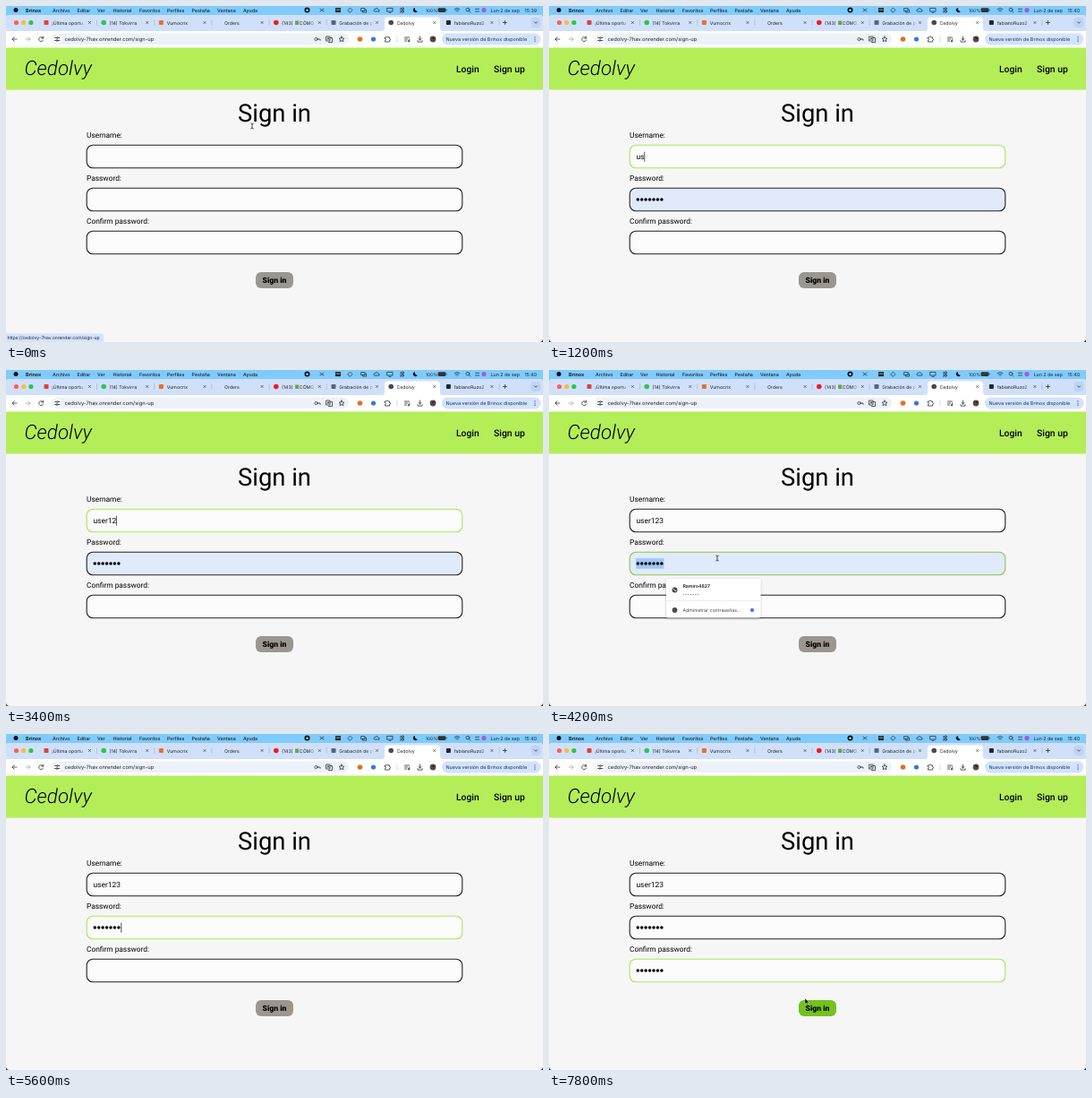
An HTML page for the animation above (8 s loop, 600 px wide and 375 px high).

```html
<!DOCTYPE html>
<html lang="es">
<head>
<meta charset="utf-8">
<title>Sign in</title>
<style>
  html, body { margin: 0; width: 100%; height: 100%; overflow: hidden; background: #222; }
  svg { display: block; }
  #stage { width: 100%; height: 100%; }
  text { font-family: Inter, sans-serif; fill: #1f1f1f; text-rendering: geometricPrecision; white-space: pre; }
  .page text { font-family: Roboto, sans-serif; fill: #000; }
  .line { fill: none; stroke: #333; stroke-width: .8; stroke-linecap: round; stroke-linejoin: round; }
  .box { stroke-width: 1.1; }
</style>
</head>
<body>
<svg id="stage" viewBox="0 0 600 375">
  <defs>
    <linearGradient id="fade"><stop offset="0" stop-color="#d1e0fa" stop-opacity="0"/><stop offset="1" stop-color="#d1e0fa"/></linearGradient>
    <filter id="shadow" x="-10%" y="-10%" width="120%" height="130%"><feDropShadow dx="0" dy=".8" stdDeviation="1" flood-opacity=".3"/></filter>
  </defs>

  <rect width="600" height="60" fill="#80cbfd"/>
  <g id="menu" transform="translate(0 -.4)"></g>

  <path d="M0 14q0-4 4-4h592q4 0 4 4v357q0 4-4 4h-592q-4 0-4-4z" fill="#f6f6f6"/>
  <path d="M0 28v-14q0-4 4-4h592q4 0 4 4v14z" fill="#d1e0fa"/>
  <path d="M420 28q3 0 3-3v-9q0-3.500 3.500-3.500h55q3.500 0 3.500 3.500v9q0 3 3 3z" fill="#fff"/>
  <rect x="586.500" y="13" width="11" height="11" rx="3" fill="#c0d3f6"/>
  <g id="tabs"></g>

  <rect y="28" width="600" height="19" fill="#fff"/>
  <rect x="51" y="30.500" width="332" height="12.500" rx="6.250" fill="#edf1fa"/>
  <circle cx="57.500" cy="37" r="4.800" fill="#fff"/>
  <g class="line">
    <path d="M12 37h-5m2.200-2.200l-2.200 2.200l2.200 2.200"/>
    <path d="M22 37h5m-2.200-2.200l2.200 2.200l-2.200 2.200" stroke="#aaa"/>
    <path d="M41.500 36a2.500 2.500 0 1 0 .1 2m0-4v2h-2"/>
    <path d="M54.500 35.500h2m2 0h1.500m-5.500 3h1.500m2 0h2"/><circle cx="57.500" cy="35.500" r=".9"/><circle cx="57" cy="38.500" r=".9"/>
    <circle cx="346.500" cy="37" r="1.600"/><path d="M348 37h3v1.300"/>
    <path d="M358 34h4v5h-4zm4 1.500h2.500v5h-4M359 37.500l1-2.200l1 2.200"/>
    <path d="M375 34l.9 2l2.100.2l-1.600 1.400l.5 2.100l-1.900-1.100l-1.900 1.100l.5-2.100l-1.600-1.400l2.100-.2z"/>
    <path d="M423.500 35h1.500a1 1 0 0 1 2 0h1.500v1.500a1 1 0 0 1 0 2v1.500h-5v-1.500a1 1 0 0 0 0-2z"/>
    <path d="M445.500 35h5m-5 2h3m-3 2h2m3-2v2.500"/><circle cx="449.700" cy="39.300" r=".6"/>
    <path d="M462.500 34v4m-1.800-1.700l1.800 1.700l1.800-1.700m-4.300 2.300v1.500h5v-1.500"/>
    <path d="M437 34v6" stroke="#c8d4ea"/>
  </g>
  <circle cx="395.500" cy="37" r="2.800" fill="#e2701e"/>
  <circle cx="410.500" cy="37" r="2.600" fill="#3478e0"/>
  <circle cx="477" cy="37" r="3.400" fill="#574943"/><circle cx="477.500" cy="36" r="1.100" fill="#211c1b"/>
  <text x="65.500" y="39" font-size="5.800">cedolvy-7hav.onrender.com/sign-up</text>
  <rect x="487" y="30.500" width="110.500" height="13" rx="6.500" fill="#d3e3fd"/>
  <text x="491.500" y="39" font-size="5.450" style="fill:#14315f">Nueva versión de Brinox disponible</text>
  <g fill="#14315f"><circle cx="591" cy="34.800" r=".6"/><circle cx="591" cy="37" r=".6"/><circle cx="591" cy="39.200" r=".6"/></g>

  <g class="page">
    <rect y="46.500" width="600" height="47" fill="#b3ee59"/>
    <text x="20.500" y="77" font-size="22.400" font-weight="300" font-style="italic">Cedolvy</text>
    <text x="503" y="74" font-size="10.300" font-weight="500">Login</text>
    <text x="545" y="74" font-size="10.400" font-weight="500">Sign up</text>
    <text x="300" y="128.800" font-size="27.400" text-anchor="middle">Sign in</text>
    <g id="fields"></g>
    <rect id="button" x="279" y="297" width="42" height="18" rx="6"/>
    <text x="300" y="308.800" font-size="8.600" font-weight="900" text-anchor="middle">Sign in</text>
  </g>

  <g id="popup">
    <rect width="105.500" height="43.500" rx="2" fill="#fff" filter="url(#shadow)"/>
    <path d="M0 24.500h105.500" stroke="#e2e2e2" stroke-width=".6"/>
    <circle cx="9.500" cy="12.500" r="3" fill="#3f4246"/>
    <path d="M7.500 11.500q2 0 2 1.500t2 0" fill="none" stroke="#fff" stroke-width=".8"/>
    <text x="18.500" y="9.500" font-size="5.200" font-weight="600">Ramiro4827</text>
    <g id="popupDots" fill="#555"></g>
    <circle cx="9.500" cy="35" r="2.900" fill="#4a4d51"/>
    <text x="18.500" y="36.600" font-size="5.250" style="fill:#444">Administrar contraseñas...</text>
    <circle cx="96" cy="35" r="2.200" fill="#4a84ee"/>
  </g>

  <g id="status">
    <path d="M0 365.500h106q3 0 3 3v6.500h-109z" fill="#d3e3fd"/>
    <text x="1.500" y="372.300" font-size="5">https://cedolvy-7hav.onrender.com/sign-up</text>
  </g>
  <path id="beam" class="line" d="M-1.300-3q1.300 0 1.300 1v4q0 1-1.300 1m2.600-6q-1.300 0-1.300 1m0 4q0 1 1.300 1" style="stroke:#111;stroke-width:.7"/>
  <path id="arrow" d="M0-2v6.500l1.500-1.400l1 2.300l1-.4l-1-2.300h2z" fill="#000" stroke="#fff" stroke-width=".4"/>
</svg>
<script>
const $ = id => document.getElementById(id);
const text = (x, y, size, str, extra = '') => `<text x="${x}" y="${y}" font-size="${size}" ${extra}>${str}</text>`;
const dot = (x, y, r, fill) => `<circle cx="${x}" cy="${y}" r="${r}" ${fill ? `fill="${fill}"` : ''}/>`;
const line = (d, extra = '') => `<path class="line" d="${d}" ${extra}/>`;

// System menu
const menuItems = { Archivo: 52, Editar: 79.5, Ver: 102, Historial: 119.5, Favoritos: 149, Perfiles: 180,
  'Pestaña': 207.5, Ventana: 236, Ayuda: 265 };
$('menu').innerHTML = dot(11, 5, 2.5, '#111') + text(22, 7, 5.5, 'Brinox', 'font-weight="700"') +
  Object.entries(menuItems).map(([name, x]) => text(x, 7, 5.3, name, 'font-weight="500"')).join('') +
  dot(336.5, 5, 3, '#111') + dot(336.5, 5, 1.2, '#cfe9fb') +
  '<path d="M368 2.500h6v5h-6z" fill="#222"/><path d="M368.700 4.500h4.600" stroke="#fff" stroke-width=".6"/>' +
  line('M351 3.500l4 3m-4 0l4-3M382 5l2.500-2.500l2.500 2.500l-2.500 2.500zM397 3h4v3h-4zm1.500 3v1.500h4v-3h-1.500M411 5.500q0-2 2-2q2-1.500 3 1q1.500 0 1 2h-5zM426 2.800h6v3.700h-6zm2 5h2M441 7.500v-5l4 4l-2 1.500v-6l2 1.500l-4 4') +
  '<path d="M457 2.300a2.700 2.700 0 1 0 2.800 4a3 3 0 0 1-2.800-4z" fill="#111"/>' +
  text(469, 7, 4.9, '100%') +
  '<rect x="482.500" y="2.700" width="9" height="4.600" rx="1.300" fill="#333"/><path d="M492.300 4v2" stroke="#333" stroke-width=".6"/>' +
  line('M501 4q3-2.600 6 0m-4.700 1.500q1.700-1.500 3.400 0m-1.700 1.400h.1M517.500 6.200l1.300 1.300M524.500 3.700h4m-4 2.700h4') +
  '<circle cx="516" cy="4.600" r="1.900" class="line"/>' + dot(534, 5, 2.6, '#a85ccf') +
  text(541.5, 7, 5.3, 'Lun 2 de sep') + '<text id="clock" x="593" y="7" font-size="5.300" text-anchor="end"></text>';

// Browser tabs: title, icon colour
const tabs = [['¡Última oportu', '#dc4437'], ['(14) Tokvirra', '#2cc64f'], ['Vumocrix', '#ee6c28'], ['Orders'],
  ['(143)     CÓMO', '#f01d1d'], ['Grabación de p', '#52657a'], ['Cedolvy', '#454a50'], ['fabianoRuzo2', '#20252a']];
const closeX = x => line(`M${x - 1.2} 17.300l2.400 2.400m0-2.400l-2.400 2.400`, 'style="stroke-width:.6"');
$('tabs').innerHTML = ['#fe5f57', '#febc2e', '#28c840'].map((c, i) => dot(11.5 + i * 8.2, 18.5, 2.6, c)).join('') +
  tabs.map(([title, color], i) => {
    const x = 45 + i * 64.2, active = i === 6;
    const icon = !color ? '' : i % 7 === 0 || i === 2 || i === 5
      ? `<rect x="${x - 2.5}" y="16" width="5" height="5" rx=".8" fill="${color}"/>` : dot(x, 18.5, 2.8, color);
    const fade = active ? '' : '<rect x="30" width="9" height="10" fill="url(#fade)"/>';
    const mark = i === 4 ? '<rect x="15" y="3" width="4" height="4.500" fill="#6ba447"/>' : '';
    const rule = i === 5 || active ? '' : line(`M${x + 56.5} 15.500v6`, 'style="stroke:#9db0d2;stroke-width:.6"');
    return icon + `<svg x="${x + 6.3}" y="13.500" width="39" height="10">${text(0, 7, 5.2, title)}${mark}${fade}</svg>` +
      closeX(x + 48.5) + rule;
  }).join('') + line('M555.500 18.500h4m-2-2v4M590.500 17.800l1.500 1.500l1.500-1.500');

// Form fields
const LEFT = 97.5, PITCH = 4.43;
const dots = (count, x, y, pitch, r) => Array.from({ length: count }, (_, i) => dot(x + (i + .4) * pitch, y, r)).join('');
$('popupDots').innerHTML = dots(7, 18.5, 17.5, 2.6, .55);
$('fields').innerHTML = ['Username:', 'Password:', 'Confirm password:'].map((label, i) => {
  const top = 155.2 + i * 48;
  return text(90, top - 8.4, 8.35, label) +
    `<rect id="box${i}" class="box" x="90.200" y="${top}" width="419.600" height="25.600" rx="7"/>
     <rect id="sel${i}" x="${LEFT - .5}" y="${top + 7}" height="11.500" fill="#a0c8f5"/>
     ${text(LEFT, top + 15.6, 8.4, '', `id="val${i}"`)}<g id="dots${i}" fill="#000"></g>
     <path id="caret${i}" d="M0 ${top + 7.5}v11" stroke="#111" stroke-width=".7"/>`;
}).join('');

// Every entry changes the state that came before it
const script = {
  0: { clock: '15:39', status: true, beam: [275, 134], arrow: null, user: '', pass: 0, confirm: 0,
       focus: -1, select: -1, popup: null, autoUser: false, autoPass: false, hover: false },
  200: { status: false, beam: [262, 146], user: 'Ramiro4827', pass: 7, autoUser: true, autoPass: true },
  400: { beam: [236, 166] },
  600: { focus: 0, popup: 185 },
  800: { select: 0 },
  1000: { clock: '15:40', user: 'u', select: -1, autoUser: false, popup: null, beam: null },
  1200: { user: 'us' },
  1400: { user: 'use' },
  1600: { user: 'user' },
  1800: { user: 'user1' },
  2200: { beam: [212, 190] },
  2400: { beam: [206, 210] },
  2600: { focus: 1, select: 1, popup: 233 },
  3000: { beam: [186, 176] },
  3200: { focus: 0, select: -1, popup: null },
  3400: { user: 'user12', beam: null },
  3600: { user: 'user123' },
  3800: { beam: [178, 186] },
  4000: { beam: [188, 210] },
  4200: { focus: 1, select: 1, popup: 233 },
  4600: { pass: 1, select: -1, popup: null, beam: null, autoPass: false },
  4800: { pass: 2 }, 5000: { pass: 3 }, 5200: { pass: 5 }, 5400: { pass: 6 }, 5600: { pass: 7 },
  6000: { focus: 2 },
  6200: { confirm: 1 }, 6400: { confirm: 2 }, 6600: { confirm: 3 }, 6800: { confirm: 4 },
  7000: { confirm: 6 }, 7200: { confirm: 7 },
  7400: { beam: [262, 268] },
  7600: { beam: null, arrow: [272, 288] },
  7800: { arrow: [286, 297], hover: true }
};

const show = (id, on) => $(id).style.display = on ? '' : 'none';
const place = (id, point) => {
  show(id, point);
  if (point) $(id).setAttribute('transform', `translate(${point})`);
};

function drawField(i, state) {
  const value = [state.user, state.pass, state.confirm][i];
  const auto = [state.autoUser, state.autoPass, false][i];
  const focused = state.focus === i, selected = state.select === i;
  if (i === 0) $('val0').textContent = value;
  else $('dots' + i).innerHTML = dots(value, LEFT, 216 + (i - 1) * 48, PITCH, 1.75);
  const width = i === 0 ? $('val0').getComputedTextLength() : value * PITCH;
  $('box' + i).setAttribute('fill', auto ? '#e0eafb' : '#fcfcfc');
  $('box' + i).setAttribute('stroke', focused ? (auto ? '#8fc64a' : '#a9e55c') : '#222');
  $('sel' + i).setAttribute('width', width + .5);
  show('sel' + i, selected);
  $('caret' + i).setAttribute('transform', `translate(${LEFT + width + .3})`);
  show('caret' + i, focused && !selected && state.confirm < 7);
}

function draw(state) {
  $('clock').textContent = state.clock;
  show('status', state.status);
  for (let i = 0; i < 3; i++) drawField(i, state);
  place('popup', state.popup && [131, state.popup]);
  place('beam', state.beam);
  place('arrow', state.arrow);
  $('button').setAttribute('fill', state.hover ? '#73c31c' : '#9b9690');
}

const LOOP = 8000, STEP = 200;
let shown = -1;
function tick() {
  const step = Math.floor(performance.now() % LOOP / STEP);
  if (step !== shown) {
    const state = {};
    for (const time in script) if (time <= step * STEP) Object.assign(state, script[time]);
    draw(state);
    shown = step;
  }
  requestAnimationFrame(tick);
}
tick();
</script>
</body>
</html>
```
